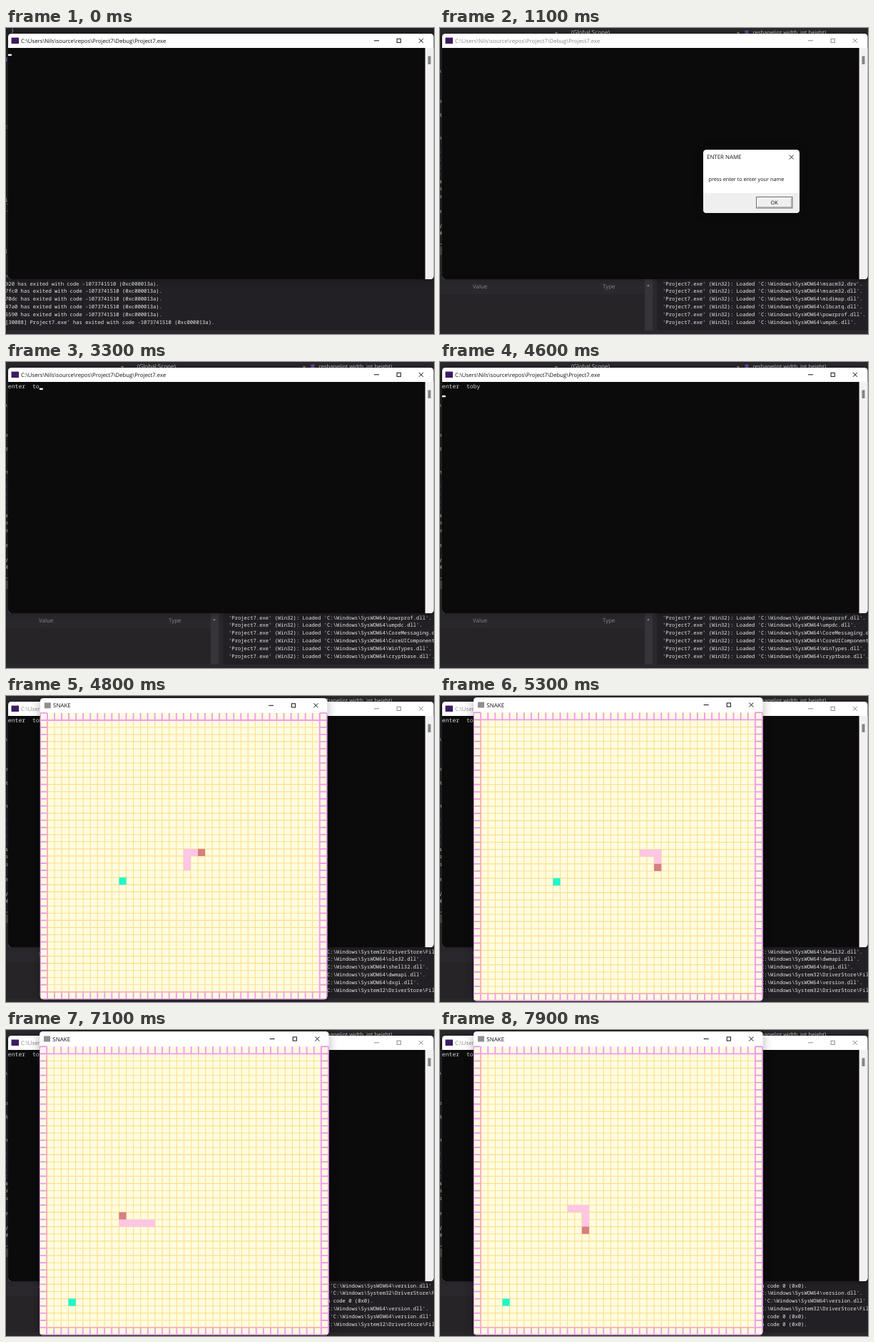
Animation of 600x430 px, one loop 8000 ms. Source, as an HTML page with a canvas:

```html
<!DOCTYPE html>
<html lang="en">
<head>
<meta charset="utf-8">
<title>Console snake</title>
<style>
html, body { margin: 0; width: 100%; height: 100%; overflow: hidden; background: #222024; }
canvas { display: block; width: 600px; height: 430px; }
</style>
</head>
<body>
<canvas id="stage" width="600" height="430"></canvas>
<script>
const ctx = document.getElementById('stage').getContext('2d');
const LOOP = 8000, STEP = 100;
const MONO = '"Noto Sans Mono", "DejaVu Sans Mono", monospace';
const SANS = '"Open Sans", "Noto Sans", sans-serif';
const PATH = 'C:\\Users\\Nils\\source\\repos\\Project7\\Debug\\Project7.exe';
const NAME = 'toby';
const EDITOR = '#222024', BAR = '#2a282c';

// Moments of the story, in ms
const T = { debug: 400, dialog: 800, prompt: 1900, type: 2900, key: 300, enter: 4600, game: 4700, eat: 7100 };

// ---------- helpers ----------
function rect(x, y, w, h, color) {
  ctx.fillStyle = color;
  ctx.fillRect(x, y, w, h);
}

function text(str, x, y, size, color, family = SANS) {
  ctx.font = size + 'px ' + family;
  ctx.fillStyle = color;
  ctx.fillText(str, x, y);
}

function line(color, width, ...points) {
  ctx.strokeStyle = color;
  ctx.lineWidth = width;
  ctx.beginPath();
  for (let i = 0; i < points.length; i += 4) {
    ctx.moveTo(points[i], points[i + 1]);
    ctx.lineTo(points[i + 2], points[i + 3]);
  }
  ctx.stroke();
}

function cross(x, y, r, color) {
  line(color, 1, x - r, y - r, x + r, y + r, x - r, y + r, x + r, y - r);
}

function buttons(x, y, gap, color) {
  line(color, 1, x - 3.5, y, x + 3.5, y);
  ctx.strokeRect(x + gap - 2.6, y - 2.6, 5.2, 5.2);
  cross(x + 2 * gap, y, 3, color);
}

function arrow(x, y, dir, color) {
  ctx.fillStyle = color;
  ctx.beginPath();
  ctx.moveTo(x - 2, y);
  ctx.lineTo(x + 2, y);
  ctx.lineTo(x, y + 2.4 * dir);
  ctx.fill();
}

// Rounded window with a shadow; body() is drawn clipped to it
function panel(x, y, w, h, blur, body) {
  ctx.save();
  ctx.beginPath();
  ctx.roundRect(x, y, w, h, 4.5);
  ctx.save();
  ctx.shadowColor = 'rgba(0,0,0,.3)';
  ctx.shadowBlur = blur;
  ctx.fillStyle = '#fff';
  ctx.fill();
  ctx.restore();
  ctx.clip();
  body();
  ctx.restore();
}

// Draws scaled around a fixed point, for opening windows
function zoomed(cx, cy, scale, alpha, draw) {
  ctx.save();
  ctx.globalAlpha = alpha;
  ctx.translate(cx, cy);
  ctx.scale(scale, scale);
  ctx.translate(-cx, -cy);
  draw();
  ctx.restore();
}

// ---------- output log ----------
const PROC = "'Project7.exe' (Win32): ";
const load = f => PROC + "Loaded 'C:\\Windows\\SysWOW64\\" + f + "'.";
const unload = f => PROC + "Unloaded 'C:\\Windows\\SysWOW64\\" + f + "'";
const STORE = "'C:\\Windows\\System32\\DriverStore\\FileRepository\\";
const driver = PROC + 'Loaded ' + STORE;
const driverOff = PROC + 'Unloaded ' + STORE;
const thread = id => 'The thread 0x' + id + ' has exited with code 0 (0x0).';

const LOG = [
  ...['ntdll.dll', 'kernel32.dll', 'KernelBase.dll', 'user32.dll', 'glut32.dll', 'winmm.dll',
    'msacm32.drv', 'msacm32.dll', 'midimap.dll', 'clbcatq.dll', 'powrprof.dll', 'umpdc.dll',
    'CoreMessaging.dll', 'CoreUIComponents.dll', 'WinTypes.dll', 'cryptbase.dll'].map(load),
  driver, ...['ole32.dll', 'shell32.dll', 'dwmapi.dll', 'dxgi.dll'].map(load), driver,
  load('version.dll'), driver,
  unload('version.dll'), driverOff, thread('5a10'),
  load('version.dll'), unload('version.dll'), driver, thread('61c4'), thread('2f78')
];
const LOG_STEPS = [[400, 6], [600, 9], [700, 12], [2300, 16], [4700, 18], [4800, 22],
  [5000, 24], [5500, 26], [5700, 30], [7400, 32]];
const EXIT = " has exited with code -1073741510 (0xc000013a).";
const OLD_LOG = ['920', '7fc0', '70dc', '47a0', '6590', "[30088] Project7.exe'"].map(s => s + EXIT);

function logLines(lines, x) {
  lines.forEach((s, i) => text(s, x, 361.5 + i * 10.8, 7.2, '#e8e8e8', MONO));
}

// ---------- editor behind the windows ----------
function sliver(marks, color) {
  for (const [y, s] of marks) text(s, -1.8, y + 2.5, 7.2, color, MONO);
}

function editorIdle() {
  rect(0, 0, 600, 430, EDITOR);
  text('}', 7, 6, 7.2, '#c8c8c8', MONO);
  rect(0, 41, 1.6, 6, '#5a4fc0');
  sliver([[138, 'c'], [241, 'i'], [313, ']'], [348, 'n']], '#b4b4b4');
  rect(0, 247, 3, 1, '#555');
  rect(0, 257, 3, 1, '#555');
  rect(0, 320, 3, 22, BAR);
  logLines(OLD_LOG, -1);
  rect(0, 425, 600, 5, BAR);
}

function editorDebug(t) {
  rect(0, 0, 600, 430, EDITOR);
  rect(0, 0, 600, 11, BAR);
  arrow(163, 6, 1, '#999');
  text('(Global Scope)', 184, 9.3, 8.1, '#d0d0d0');
  arrow(418, 6, 1, '#999');
  rect(427.5, 3.5, 5, 6, '#6c4a9c');
  text('reshape(int width, int height)', 438.5, 9.3, 7.7, '#d0d0d0');
  sliver([[60, '\\'], [102, 'o'], [122, 'R'], [154, 'n'], [215, 'a'], [225, 'p'],
    [236, 'b'], [257, 'e'], [278, 'V'], [288, 'M'], [300, '_']], '#c8c8c8');
  sliver([173, 184, 195, 205].map(y => [y, ':']), '#6a78d8');
  rect(0, 307, 3, 12, '#46464a');
  rect(0, 319, 304, 111, BAR);
  rect(0, 374, 287, 56, '#262427');
  rect(287, 353, 11, 77, '#363438');
  arrow(292, 363, -1, '#8a8a8e');
  text('Value', 46, 365.8, 7.9, '#85858a');
  text('Type', 228, 365.8, 7.9, '#85858a');
  let count = 0;
  for (const [at, n] of LOG_STEPS) if (t >= at) count = n;
  logLines(LOG.slice(Math.max(0, count - 6), count), 312);
  rect(0, 425, 600, 5, BAR);
}

// ---------- console ----------
function consoleWindow(t) {
  const active = t < T.dialog || (t >= T.prompt && t < T.game);
  const ink = active ? '#111' : '#8a8a8a';
  panel(3, 8, 596.5, 345, active ? 12 : 6, () => {
    rect(7.5, 13.5, 10.5, 8.5, '#3c1c60');
    text(PATH, 21, 20.8, 7.77, ink);
    buttons(519.5, 17.8, 31.2, ink);
    rect(3, 28, 585, 325, '#0c0b0c');
    rect(587.6, 28, 13, 325, '#f2f0f1');
    rect(591.5, 39.5, 4, 11.5, '#858585');
    let shown = '', lastKey = 0;
    if (t >= T.prompt) {
      const n = Math.max(0, Math.min(NAME.length, Math.floor((t - T.type) / T.key) + 1));
      shown = 'enter  ' + NAME.slice(0, n);
      lastKey = n ? T.type + (n - 1) * T.key : T.prompt;
      text(shown, 2.8, 36.8, 8.13, '#d4d4d4', MONO);
    }
    const entered = t >= T.enter;
    if (entered) lastKey = T.enter;
    if (active && (t - lastKey) % 1060 < 530) {
      rect(3 + (entered ? 0 : shown.length * 4.88), entered ? 47 : 36.7, 4.8, 2.4, '#fff');
    }
  });
}

function dialog() {
  panel(369, 171, 135, 89, 14, () => {
    text('ENTER NAME', 374, 184, 7.9, '#111');
    cross(492.7, 181.5, 3, '#222');
    text('press enter to enter your name', 376.5, 214.6, 7.28, '#111');
    rect(369, 232, 135, 28, '#f0eff0');
    rect(443, 237, 51.5, 16.5, '#666');
    rect(444, 238, 49.5, 14.5, '#fff');
    rect(445, 239, 48.5, 13.5, '#999');
    rect(445, 239, 47.3, 12.3, '#f0eff0');
    text('OK', 463.4, 247.9, 7.4, '#111');
  });
}

// ---------- snake ----------
const N = 40, CELL = 405 / N, GX = 47, GY = 23.2;
const route = [[20, 23]];
for (const [dx, dy, n] of [[0, -1, 4], [1, 0, 5], [0, 1, 5], [-1, 0, 14], [0, -1, 2], [1, 0, 4], [0, 1, 8]]) {
  for (let i = 0; i < n; i++) {
    const [x, y] = route[route.length - 1];
    route.push([x + dx, y + dy]);
  }
}

function cell([c, r], color) {
  rect(GX + c * CELL, GY + r * CELL, CELL + 0.1, CELL + 0.1, color);
}

function board() {
  const end = N * CELL, inner = end - CELL;
  ctx.save();
  ctx.translate(GX, GY);
  rect(0, 0, end, end, '#fffce0');
  for (let i = 2; i < N - 1; i++) {
    const p = i * CELL;
    line('#ffdf8c', 1.1, p, CELL, p, inner, CELL, p, inner, p);
  }
  const violet = '#f09af0';
  for (let i = 0; i <= N; i++) {
    const p = i * CELL;
    line(violet, 1.9, p, 0, p, CELL, p, inner, p, end, 0, p, CELL, p, inner, p, end, p);
  }
  line(violet, 1.9, 0, CELL, end, CELL, inner, 0, inner, end, 0, end, end, end, 0, 0, 0, end, end, 0, end, end);
  line('#fab0b4', 1.9, CELL, CELL, CELL, inner, CELL, inner, inner, inner);
  ctx.restore();
}

function game(t) {
  const head = 6 + Math.floor((t - 4800) / STEP);
  const eaten = t >= T.eat;
  panel(47, 2, 405.5, 426.5, 14, () => {
    rect(53, 8.5, 9, 8, '#8f8f92');
    text('SNAKE', 65.3, 15.6, 8, '#111');
    buttons(373.2, 12.5, 31.6, '#111');
    board();
    cell(eaten ? [4, 35] : [11, 23], '#1cf8cc');
    for (let i = head - (eaten ? 5 : 4); i < head; i++) if (route[i]) cell(route[i], '#fdc6e4');
    cell(route[head], '#d78080');
  });
}

// ---------- playback ----------
function draw(t) {
  ctx.textRendering = 'geometricPrecision';
  if (t < T.debug) editorIdle();
  else editorDebug(t);
  consoleWindow(t);
  if (t >= T.dialog && t < T.prompt) {
    const opening = t < T.dialog + STEP;
    zoomed(436.5, 215.5, opening ? 0.95 : 1, opening ? 0.6 : 1, dialog);
  }
  if (t >= T.game) {
    const scale = t < 4800 ? 0.94 : t < 4900 ? 0.9925 : 1;
    zoomed(165, 120, scale, t < 4800 ? 0.6 : 1, () => game(t));
  }
}

const start = performance.now();
function tick() {
  const t = (performance.now() - start + 1) % LOOP;
  draw(Math.floor(t / STEP) * STEP);
  requestAnimationFrame(tick);
}
tick();
</script>
</body>
</html>
```
